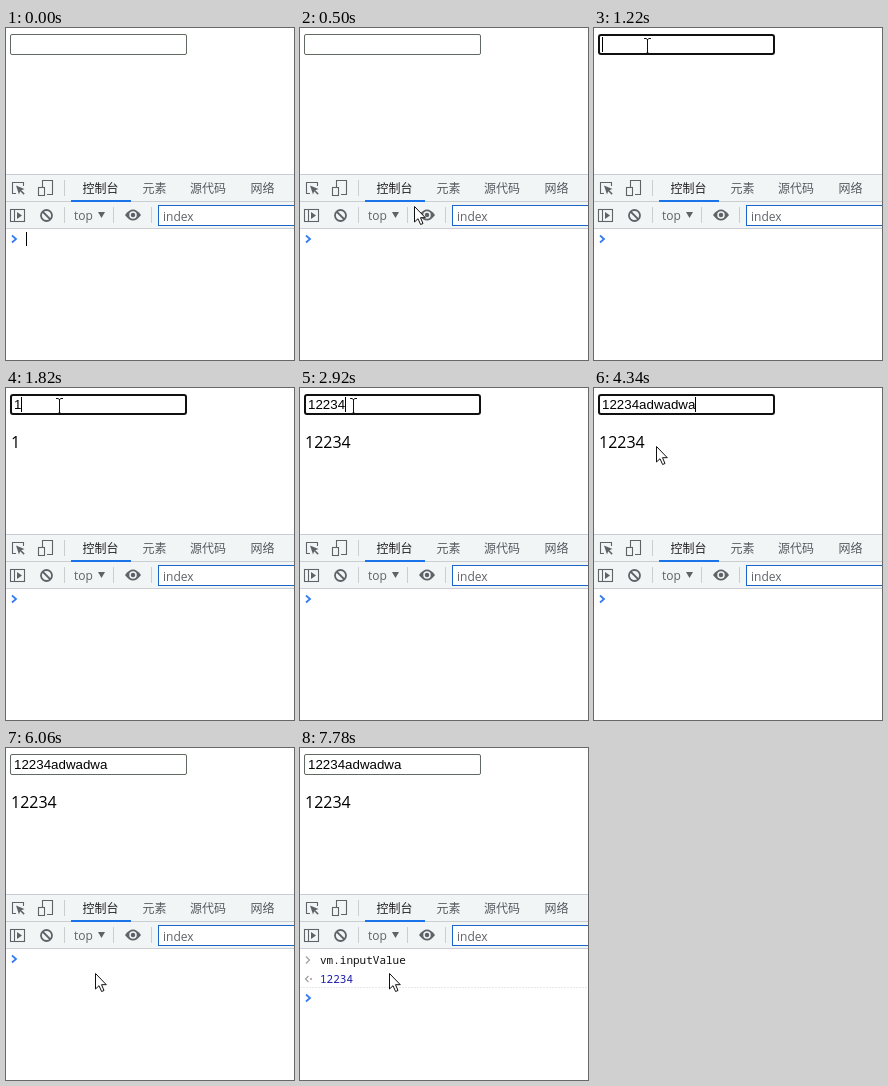
Animation, 288 px wide and 332 px high, one loop 8 s. Source, as an HTML page:

```html
<!DOCTYPE html>
<html lang="zh-CN">
<head>
<meta charset="utf-8">
<style>
html, body { margin: 0; width: 288px; height: 332px; overflow: hidden; background: #fff; }
svg { display: block; }
.ui { font: 12px "Noto Sans CJK SC", "Noto Sans CJK", sans-serif; fill: #555a5f; }
.ui .active { fill: #202124; }
.latin { font: 12px "Open Sans", "Noto Sans", sans-serif; fill: #5f6368; }
.mono { font: 11px "Noto Sans Mono", "DejaVu Sans Mono", monospace; fill: #111; }
.mono.number { fill: #1a1aa6; }
.line { fill: none; stroke: #5f6368; stroke-width: 1.1; }
.line.bold { stroke-width: 1.8; }
.solid { fill: #5f6368; }
.sep { stroke: #cacdd1; }
.chevron { fill: none; stroke: #367cf1; stroke-width: 1.8; }
.chevron.past { stroke: #a29ba4; stroke-width: 1.2; }
#field { font: 13.333px "Liberation Sans", Arial, sans-serif; }
#echo { font: 16px "Open Sans", "Noto Sans", sans-serif; }
</style>
</head>
<body>
<svg width="288" height="332">
  <!-- page -->
  <rect id="box" fill="#fff"/>
  <text id="field" x="8" y="21"/>
  <text id="echo" x="5" y="60"/>

  <!-- panel tabs -->
  <rect y="146" width="288" height="55" fill="#f2f5f6"/>
  <path class="sep" d="M0 146.5H288M0 173.5H288M0 200.5H288M58.5 152V168M58.5 179V195M107.5 179V195M145.5 179V195"/>
  <rect x="65" y="172" width="60" height="2" fill="#1a73e8"/>
  <g class="ui">
    <text class="active" x="76.5" y="165">控制台</text>
    <text x="136.5" y="165">元素</text>
    <text x="184" y="165">源代码</text>
    <text x="244.5" y="165">网络</text>
  </g>
  <path class="line" d="M10 165.5H6.5V154.5H17.5V158M36.5 160V152.5H46.5V166.5H41"/>
  <path class="solid" d="M10 157.5L18.5 161L15.3 162.2L18.7 165.6L17.6 166.7L14.2 163.3L13 166.5Z"/>
  <rect class="line" x="32.5" y="159.5" width="6" height="8"/>

  <!-- console toolbar -->
  <rect class="line" x="4.5" y="181.5" width="14" height="12"/>
  <path class="line" d="M8.5 181V194"/>
  <path class="solid" d="M11 184L16 187.5L11 191Z"/>
  <g class="line bold"><circle cx="40.5" cy="187.5" r="5.5"/><path d="M36.5 183.5L44.5 191.5"/></g>
  <text class="latin" x="68" y="192">top</text>
  <path class="solid" d="M92 184H99L95.5 190Z"/>
  <path class="solid" d="M119 187Q127 176 135 187Q127 198 119 187Z"/>
  <circle class="solid" cx="127" cy="187" r="3" stroke="#f2f5f6" stroke-width="1.5"/>
  <rect x="152.5" y="177.5" width="150" height="20" fill="#fff" stroke="#1a66c8"/>
  <text class="latin" x="157" y="193">index</text>

  <!-- console body -->
  <path id="prompt" class="chevron" d="M6 207.5L10 211L6 214.5"/>
  <text id="command" class="mono" x="20" y="216"/>
  <g id="result">
    <path class="chevron past" d="M6 208.5L9.5 212L6 215.5M8.5 228L5.5 231L8.5 234"/>
    <circle cx="11" cy="231" r="1" fill="#b58b96"/>
    <text class="mono number" x="20" y="235">12234</text>
    <path d="M0 239.5H288" stroke="#e8e8e8" stroke-dasharray="2 1"/>
  </g>
  <rect id="caret" width="1" fill="#000"/>

  <!-- pointer -->
  <path id="beam" fill="none" stroke="#111" d="M-3 -7.5H-1L.5 -6.5L2 -7.5H4M-3 7.5H-1L.5 6.5L2 7.5H4M.5 -7V7"/>
  <path id="arrow" fill="#fff" stroke="#111" d="M.5 .5V16L4 12.7L6.6 18.5L9 17.5L6.5 11.7H11.3Z"/>
</svg>
<script>
const $ = id => document.getElementById(id);
const LOOP = 8000, FOCUS = 1220, BLUR = 5240, PASTE = 6260, ENTER = 7280;

// [time, value] steps
const typed = [[0, ""], [1820, "1"], [2020, "12"], [2520, "122"], [2720, "1223"], [2920, "12234"],
  [3640, "12234a"], [3740, "12234ad"], [3940, "12234adw"], [4040, "12234adwad"], [4140, "12234adwadwa"]];
const caretOn = [[0, 1], [500, 0], [1000, 1], [1520, 0], [1820, 1], [3540, 0], [3640, 1], [4640, 0],
  [BLUR, 1], [6060, 0], [PASTE, 1], [6760, 0], [ENTER, 1], [7780, 0]];
// [time, x, y] pointer path
const path = [[200, 150, 306], [900, 66, 8], [1000, 62, 11], [1220, 53, 18],
  [4240, 53, 18], [4740, 96, 218], [5140, 89, 225]];

const stepAt = (list, t) => list.findLast(k => k[0] <= t)[1];

function pointerAt(t) {
  const offset = t < 1100 ? 0 : t < 3000 ? 20 : 40;
  t = Math.floor((t - offset) / 100) * 100 + offset;
  const i = path.findIndex(k => k[0] > t);
  if (i < 0) return path.at(-1).slice(1);
  if (i === 0) return path[0].slice(1);
  const [a, b] = [path[i - 1], path[i]], u = (t - a[0]) / (b[0] - a[0]);
  return [1, 2].map(n => Math.round(a[n] + (b[n] - a[n]) * u));
}

function set(id, attrs) {
  for (const name in attrs) $(id).setAttribute(name, attrs[name]);
}
const show = (id, on) => $(id).style.display = on ? "" : "none";
const textWidth = id => $(id).textContent ? $(id).getComputedTextLength() : 0;

function draw(t) {
  const text = stepAt(typed, t), focused = t >= FOCUS && t < BLUR, done = t >= ENTER;
  set("box", focused
    ? { x: 5, y: 7, width: 175, height: 19, rx: 2, stroke: "#101010", "stroke-width": 2 }
    : { x: 4.5, y: 6.5, width: 176, height: 20, rx: 1.5, stroke: "#626862", "stroke-width": 1 });
  $("field").textContent = text;
  $("echo").textContent = text.slice(0, 5);
  $("command").textContent = t >= PASTE ? "vm.inputValue" : "";
  show("result", done);
  set("prompt", { transform: `translate(0 ${done ? 39 : 0})` });

  set("caret", focused
    ? { x: Math.round(8 + textWidth("field")), y: 9, height: 15 }
    : { x: Math.round(20 + (done ? 0 : textWidth("command"))), y: done ? 243 : 204, height: 14 });
  show("caret", stepAt(caretOn, t));

  const [x, y] = pointerAt(t);
  const overText = y < 27 || (y > 200 && y < 222);
  for (const id of ["beam", "arrow"]) {
    set(id, { transform: `translate(${x} ${y})` });
    show(id, t >= 200 && overText === (id === "beam"));
  }
}

const start = performance.now();
function frame() {
  draw((performance.now() - start) % LOOP);
  requestAnimationFrame(frame);
}
frame();
</script>
</body>
</html>
```
